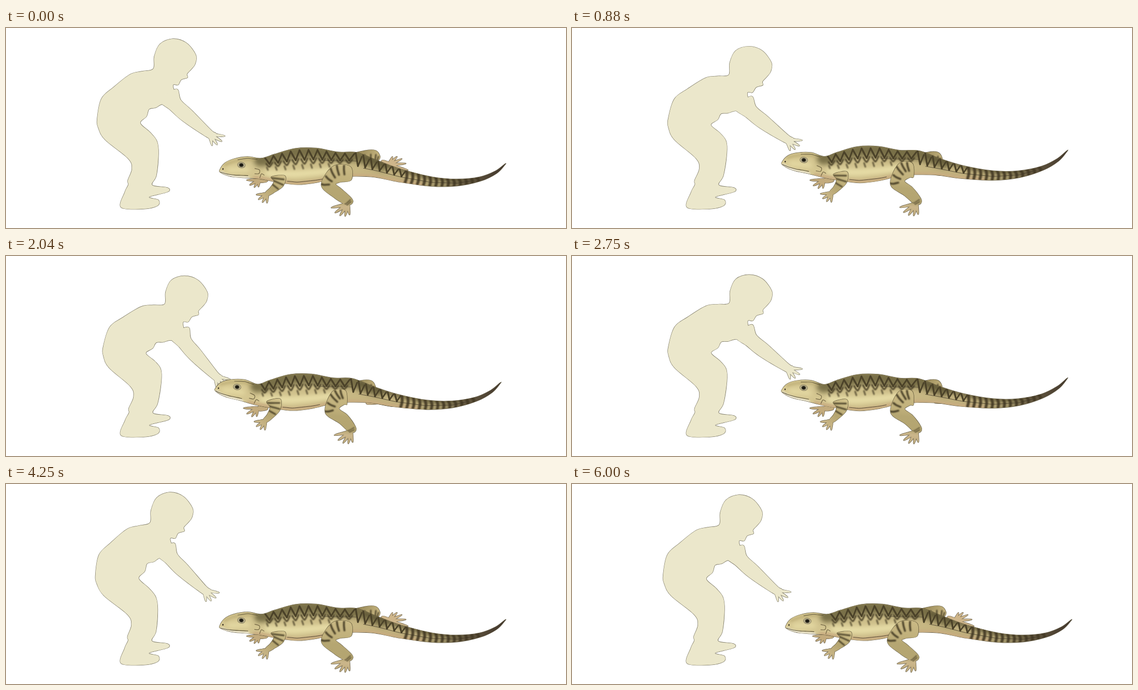
Write an HTML page with a canvas that moves like this. It is 1080 by 387 pixels and loops after 6.04 s.

```html
<!DOCTYPE html>
<html lang="en">
<head>
<meta charset="utf-8">
<title>Child and lizard</title>
<style>
html, body { margin: 0; width: 100%; height: 100%; overflow: hidden; background: #fff; }
canvas { display: block; width: 100%; height: 100%; }
</style>
</head>
<body>
<canvas id="stage" width="1080" height="387"></canvas>
<script>
const ctx = document.getElementById('stage').getContext('2d');
const LOOP = 6040;
const DARK = '#4b4229';
const clamp = (v, lo = 0, hi = 1) => Math.min(hi, Math.max(lo, v));
const mix = (a, b, k) => a + (b - a) * k;
const parse = text => text.split(' ').map(item => item.split(',').map(Number));
const radians = degrees => degrees * Math.PI / 180;

const ramp = (t, from, to) => (1 - Math.cos(Math.PI * clamp((t - from) / (to - from)))) / 2;
const pulse = (t, a, b, c, d) => ramp(t, a, b) - ramp(t, c, d);

// Catmull-Rom path
function curve(p, closed = true) {
  const n = p.length, path = new Path2D();
  const at = i => closed ? p[(i + n) % n] : p[clamp(i, 0, n - 1)];
  path.moveTo(p[0][0], p[0][1]);
  for (let i = 0; i < (closed ? n : n - 1); i++) {
    const a = at(i - 1), b = at(i), c = at(i + 1), d = at(i + 2);
    path.bezierCurveTo(b[0] + (c[0] - a[0]) / 6, b[1] + (c[1] - a[1]) / 6,
      c[0] - (d[0] - b[0]) / 6, c[1] - (d[1] - b[1]) / 6, c[0], c[1]);
  }
  if (closed) path.closePath();
  return path;
}

// A limb is a chain of joints [x, y, radius].
function normal(joints, i) {
  const a = joints[Math.max(i - 1, 0)], b = joints[Math.min(i + 1, joints.length - 1)];
  const dx = b[0] - a[0], dy = b[1] - a[1], length = Math.hypot(dx, dy);
  return [-dy / length, dx / length];
}
function across(joints, i, k, side) {
  const point = j => {
    const [x, y, r] = joints[j], [nx, ny] = normal(joints, j);
    return [x + nx * r * side, y + ny * r * side];
  };
  const a = point(i), b = point(Math.min(i + 1, joints.length - 1));
  return [mix(a[0], b[0], k), mix(a[1], b[1], k)];
}
function limb(joints) {
  const edge = side => joints.map((_, i) => across(joints, i, 0, side));
  return curve([...edge(1), ...edge(-1).reverse()]);
}
// Fingers or toes spread from one point
function fan(x, y, start, step, count, length, grow, r = 2.6) {
  return Array.from({ length: count }, (_, i) => {
    const angle = radians(start + step * i), reach = length + grow * i;
    const joint = (k, radius) => [x + Math.cos(angle) * reach * k, y + Math.sin(angle) * reach * k, radius];
    return limb([joint(0, r), joint(.6, r * .8), joint(1, r * .3)]);
  });
}

function paint(parts, fill, line = 'rgba(75,66,42,.85)', width = 1.4) {
  ctx.strokeStyle = line;
  ctx.lineWidth = width;
  parts.forEach(part => ctx.stroke(part));
  ctx.fillStyle = fill;
  parts.forEach(part => ctx.fill(part));
}
function mark(pts, width, color, blur = 0) {
  ctx.filter = blur ? `blur(${blur}px)` : 'none';
  ctx.strokeStyle = color;
  ctx.lineWidth = width;
  ctx.stroke(curve(pts, false));
  ctx.filter = 'none';
}
function clipped(path, draw) {
  ctx.save();
  ctx.clip(path);
  draw();
  ctx.restore();
}
function gradient(x0, y0, x1, y1, ...stops) {
  const g = ctx.createLinearGradient(x0, y0, x1, y1);
  stops.forEach(([at, color]) => g.addColorStop(at, color));
  return g;
}

const CHILD = parse('284,79 286,55 297,31 322,21 348,29 366,52 365,69 358,79 349,89 350,96 338,100 332,110 ' +
  '322,112 331,148 303,147 289,154 276,157 271,171 259,184 278,202 291,219 294,243 290,285 282,304 311,309 ' +
  '312,317 276,327 294,333 292,344 265,350 222,347 229,318 236,303 235,295 243,272 235,252 191,216 178,193 ' +
  '176,175 184,137 207,115 239,90 262,84');
const ARM = parse('313,129,19 327,149,14 350,170,13.5 391,204,8 402,210,6.5');
const SPINE = parse('413,277,2.5 424,273.5,12 440,271,17.5 465,269.5,20.5 492,272,20 520,271,27 560,268,35 ' +
  '600,265.5,33 640,264.5,24.5 675,264,23 715,273,16 760,285.5,12.5 820,297,9 870,299,6.5 915,292,4 ' +
  '945,279,2.5 962,264,.5');
// Leg joints: x, y, radius, then the shift at full lift
const FRONT_LEG = parse('525,287,13,-9,-8 526,301,10,-7,-6 513,314,6,-5,-3 503,321,4,-4,-2');
const HIND_LEG = parse('665,281,13,-9,-8 638,283,17,3,-8 622,303,14,7,-4 640,320,11,11,-4 661,336,8.5,6,-1 664,341,5,5,0');
const FAR_THIGH = parse('668,258,12,-9,4 695,250,13,-9,4 712,249,12,-9,4 720,252,4,-9,4');
const posed = (joints, lift) => joints.map(([x, y, r, dx, dy]) => [x + dx * lift, y + dy * lift, r]);

function drawChild(bend, degrees) {
  const lean = ([x, y]) => [
    x + bend * 22 * Math.pow(clamp((350 - y) / 260), 1.6),
    y + bend * 17.5 * clamp((x - 180) / 130) * clamp((210 - y) / 65)];
  const [px, py] = ARM[0], [sx, sy] = lean(ARM[0]);
  const cos = Math.cos(radians(degrees)), sin = Math.sin(radians(degrees));
  const arm = ARM.map(([x, y, r]) => [
    sx + 4 * bend + (x - px) * cos - (y - py) * sin, sy + (x - px) * sin + (y - py) * cos, r]);
  const [hx, hy] = arm[3];
  paint([curve(CHILD.map(lean)), limb(arm), ...fan(hx + 2, hy + 2, 6 + degrees, 24, 4, 28, -2.3, 3)],
    '#ebe7cb', '#77735f');
}

function stripes(joints, from, to, count, inner, width) {
  for (let n = 0; n < count; n++) {
    const u = mix(from, to, n / (count - 1)), i = Math.floor(u);
    const pts = [1.1, .6, inner].map((side, j) => across(joints, i, clamp(u - i + j * .06), side));
    mark(pts, width, DARK, .8);
  }
}

function drawMarkings(on) {
  const band = (from, to, side, width, color, blur) => {
    const pts = [];
    for (let x = from; x <= to; x += 9) pts.push(on(x, side));
    mark(pts, width, color, blur);
  };
  band(490, 725, -.8, 25, 'rgba(106,98,60,.85)', 5);
  band(505, 640, .42, 13, '#e8dea8', 5);
  band(480, 810, .95, 7, '#c8ab80', 2.5);
  band(690, 880, -.8, 7, 'rgba(95,87,55,.75)', 2.5);

  for (let x = 500; x < 664; x += 17) {
    mark([on(x, -.9), on(x + 8.5, -.35)], 3.4, DARK, .7);
    mark([on(x + 8.5, -.35), on(x + 17, -.9)], 3, DARK, .7);
    mark([on(x + 2, -.4), on(x + 8, -.12), on(x + 14, -.42)], 3, DARK, .8);
    if (x < 630) mark([on(x + 3, -.08), on(x + 5, .14)], 3, 'rgba(75,66,41,.8)', .8);
  }
  // V marks near the hip, then full bands along the tail
  for (let x = 672; x < 765; x += 14) {
    mark([on(x, -1), on(x + 7, .1)], 3.4, DARK, .7);
    mark([on(x + 7, .1), on(x + 12, -.8)], 2.8, DARK, .7);
  }
  for (let x = 772; x < 915; x += 11.5)
    mark([on(x - 2, -1.1), on(x + 1, 0), on(x, 1)], 5.5, 'rgba(67,57,36,.9)', 1);
  band(690, 905, .2, 1, 'rgba(58,50,35,.75)');
  band(605, 680, -.3, 1, 'rgba(58,50,35,.6)');
  band(541, 613, .87, 1, 'rgba(60,50,34,.85)');

  band(424, 482, -.75, 5, 'rgba(178,162,106,.65)', 2.5);
  band(430, 470, .2, 8, '#e6dba5', 4);
  band(414, 476, 1, 5, '#eeeadb', 1.5);
  band(413, 468, .78, 1.1, '#5d5439');
  band(448, 490, -.85, 1.2, 'rgba(75,66,41,.7)', .4);
}

function drawFace(on) {
  const oval = ([x, y], rx, ry, color) => {
    ctx.fillStyle = color;
    ctx.beginPath();
    ctx.ellipse(x, y, rx, ry, .15, 0, Math.PI * 2);
    ctx.fill();
  };
  const eye = on(454, -.26);
  oval(eye, 8, 6, '#8a8061');
  oval(eye, 6.8, 4.8, '#cbc29c');
  oval(eye, 5, 4, '#6f6950');
  oval(eye, 3.4, 3.1, '#1c1a13');
  oval(on(419, -.3), 1.3, 1.6, '#382f22');
  mark([on(480, .05), on(489, .15), on(488, .5), on(480, .55)], 1.2, 'rgba(80,68,42,.75)', .4);
  mark([on(490, .9), on(493, .5), on(498, .6)], 1.1, 'rgba(80,68,42,.8)', .3);
}

function drawLizard(lift, stroke, nod) {
  const far = posed(FAR_THIGH, lift);
  const fx = 738 - 28 * lift, fy = 265 + 16 * lift;
  paint([limb([[fx - 14, fy - 2, 7], [fx, fy, 6], [fx + 7, fy, 4]]),
    ...fan(fx, fy, -65, 20, 5, 17, 5)], '#cfb68b');
  paint([limb(far)], gradient(680, 236, 712, 264, [0, '#958656'], [1, '#d0be87']));
  clipped(limb(far), () => stripes(far, 2.6, .8, 4, -.4, 2.6));
  paint([limb([[502, 290, 7], [487, 295 + lift, 4]]),
    ...fan(488 - 3 * lift, 294, 95, 28, 4, 13 + 3 * lift, 3.3)], '#c3ab7d');

  const spine = SPINE.map(([x, y, r]) => {
    const head = clamp((490 - x) / 78), rear = clamp((x - 690) / 270);
    return [x - 9 * lift, y - 4 * lift - 14 * lift * Math.pow(head, .75)
      - (27 * lift - 13 * stroke) * Math.pow(rear, 1.4) - 2.5 * nod * Math.sin(Math.PI * head), r];
  });
  // Point on the body: resting x along it, side from -1 (back) to 1 (belly)
  const on = (x, side) => {
    let i = 0;
    while (i < SPINE.length - 2 && x > SPINE[i + 1][0]) i++;
    return across(spine, i, (x - SPINE[i][0]) / (SPINE[i + 1][0] - SPINE[i][0]), side);
  };
  const body = limb(spine);
  paint([body], gradient(412, 0, 961, 0, [0, '#d8ca94'], [.15, '#d3c590'], [.5, '#c6b682'], [.68, '#bbab79'],
    [.78, '#a19469'], [.86, '#655941'], [1, '#41362b']));
  clipped(body, () => {
    drawMarkings(on);
    drawFace(on);
  });

  const front = posed(FRONT_LEG, lift), [ax, ay] = front[3];
  paint([limb(front), ...fan(ax + 1, ay, 92, 28, 4, 17, 1.2)],
    gradient(535, 282, 495, 334, [0, '#d3c48e'], [.55, '#b5a570'], [1, '#ccb88b']));
  clipped(limb(front), () => stripes(front, .25, 1.4, 3, -.9, 2.8));

  const hind = posed(HIND_LEG, lift), [hx, hy] = hind[4];
  paint([limb(hind), ...fan(hx - 2, hy + 5, 80, 22, 5, 20, 2.8, 3)],
    gradient(655, 262, 645, 360, [0, '#cbbb86'], [.35, '#c0b07b'], [.5, '#b5a672'], [.75, '#b4a571'],
      [.85, '#cbb68b'], [1, '#c1ad7f']));
  clipped(limb(hind), () => {
    stripes(hind, .35, 1.95, 5, -.1, 3.6);
    stripes(hind, 3.9, 4.4, 2, -.6, 1.6);
  });
}

function frame(now) {
  const t = now % LOOP;
  const lift = pulse(t, 0, 1200, 2500, 3560);
  const away = pulse(t, 3500, 4800, 4800, LOOP);
  const stroke = pulse(t, 1250, 2000, 2100, 2850);
  ctx.fillStyle = '#fff';
  ctx.fillRect(0, 0, 1080, 387);
  drawChild(lift - .46 * away, 11 * stroke - 4 * lift + 5.5 * away);
  drawLizard(lift, stroke, away);
  requestAnimationFrame(() => frame(performance.now() - start));
}

ctx.lineCap = ctx.lineJoin = 'round';
const start = performance.now();
frame(0);
</script>
</body>
</html>
```
